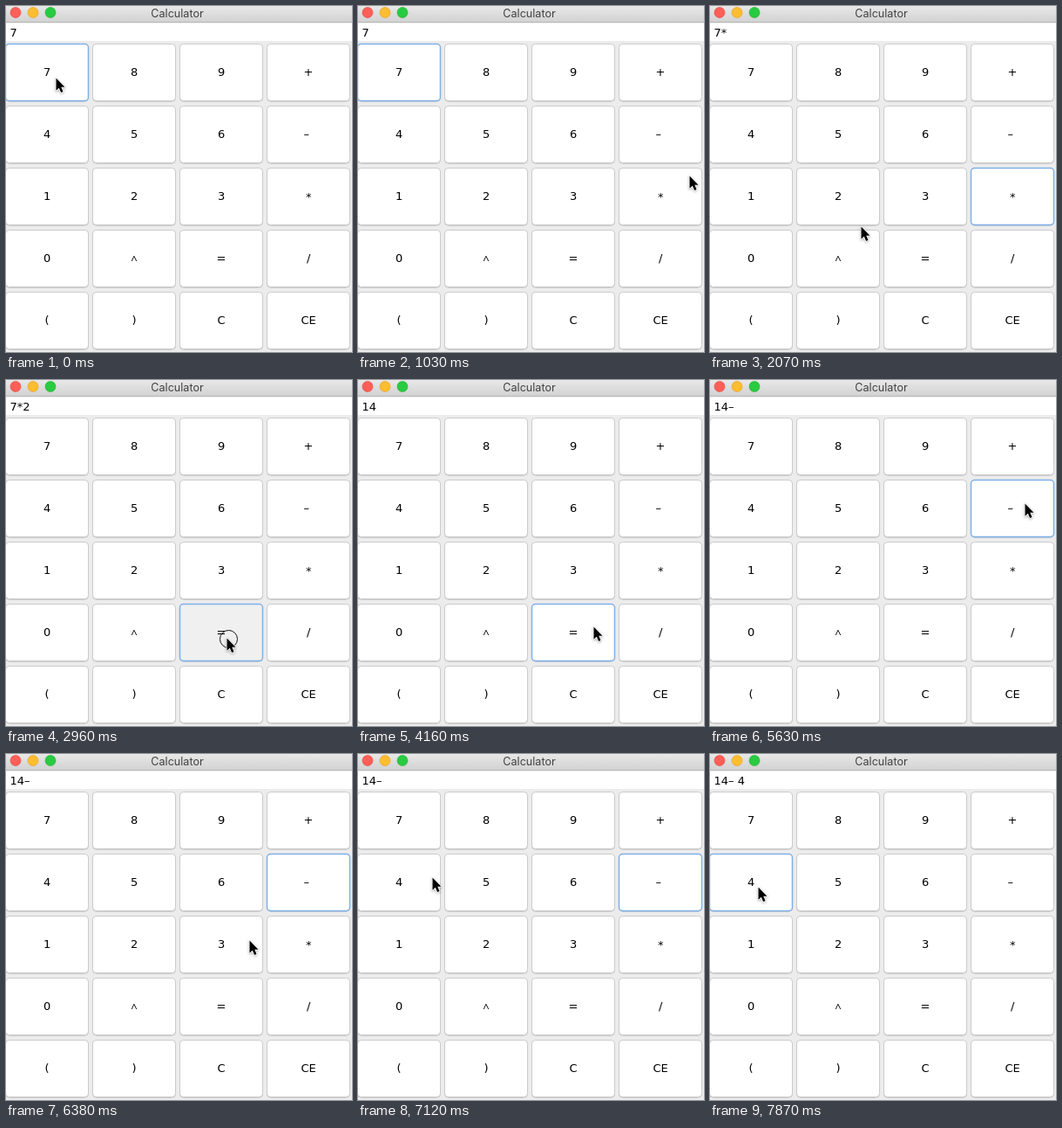
These frames come from a looping animation (397x396 px, 8 s). An HTML page with a canvas:

```html
<!DOCTYPE html>
<html lang="en">
<head>
<meta charset="utf-8">
<title>Calculator</title>
<style>
html, body { margin: 0; width: 100%; height: 100%; overflow: hidden; background: #ececec; }
canvas { display: block; }
</style>
</head>
<body>
<canvas id="stage" width="397" height="396"></canvas>
<script>
const ctx = document.getElementById('stage').getContext('2d');
const LOOP = 8000;
const FONT = '13px "DejaVu Sans", sans-serif';
const KEYS = ['7', '8', '9', '+', '4', '5', '6', '\u2013 ', '1', '2', '3', '*',
  '0', '^', '=', '/', '(', ')', 'C', 'CE'];

// The screen advances in ticks of 150 ms; each entry here shortens the clock by 10 ms.
const SHORT = [8, 8, 14, 19, 32, 32, 36, 46];
const tickStart = n => 150 * n - 10 * SHORT.filter(k => n >= k).length;

// Pointer curves between two ticks: start, control and end point.
const smooth = t => t * t * (3 - 2 * t);
const speedUp = t => Math.pow(t, 1.4);
const linear = t => t;
const MOVES = [
  { a: 1, b: 8, p: [57, 82, 475, 150, 352, 223], ease: smooth },
  { a: 12, b: 14, p: [352, 223, 238, 318, 173, 252], ease: linear },
  { a: 14, b: 16, p: [173, 252, 160, 238, 153, 226], ease: smooth },
  { a: 18, b: 20, p: [153, 226, 205, 250, 253, 295], ease: linear },
  { a: 27, b: 32, p: [253, 295, 340, 235, 362, 156], ease: smooth },
  { a: 32, b: 36, p: [362, 156, 364, 139, 361, 141], ease: smooth },
  { a: 39, b: 47, p: [361, 141, 250, 288, 153, 162], ease: speedUp },
  { a: 47, b: 48, p: [153, 162, 120, 150, 85, 141], ease: linear },
  { a: 48, b: 51, p: [85, 141, 64, 143, 55, 152], ease: smooth }
];

// Mouse down, mouse up, key, and the display after release.
const CLICKS = [
  { down: -1, up: 0, key: '7', text: '7' },
  { down: 11, up: 12, key: '*', text: '7*' },
  { down: 17, up: 18, key: '2', text: '7*2' },
  { down: 20, up: 24, key: '=', text: '14' },
  { down: 37, up: 38, key: '\u2013 ', text: '14\u2013 ' },
  { down: 52, up: 53, key: '4', text: '14\u2013 4' }
];

function pointerAt(tick) {
  const m = MOVES.filter(m => tick >= m.a).pop() || MOVES[0];
  const t = Math.min(1, Math.max(0, (tick - m.a) / (m.b - m.a)));
  const u = m.ease(t), v = 1 - u, p = m.p;
  const mix = i => v * v * p[i] + 2 * u * v * p[i + 2] + u * u * p[i + 4];
  return [Math.round(mix(0)), Math.round(mix(1))];
}

function box(x, y, w, h, r) {
  ctx.beginPath();
  ctx.roundRect(x, y, w, h, r);
}

function disc(x, y, r, fill, line) {
  ctx.beginPath();
  ctx.arc(x, y, r, 0, 7);
  ctx.fillStyle = fill;
  ctx.fill();
  ctx.strokeStyle = line;
  ctx.lineWidth = 0.6;
  ctx.stroke();
}

function drawWindow(text) {
  ctx.fillStyle = '#ececec';
  ctx.fillRect(0, 0, 397, 396);
  const bar = ctx.createLinearGradient(0, 0, 0, 18);
  bar.addColorStop(0, '#e8e8e8');
  bar.addColorStop(1, '#d2d2d2');
  ctx.fillStyle = bar;
  ctx.fillRect(0, 0, 397, 18);
  ctx.fillStyle = '#b8b8b8';
  ctx.fillRect(0, 18, 397, 1);
  disc(11, 7.5, 6, '#fc5f57', '#e2463f');
  disc(31, 7.5, 6, '#fdbd2f', '#e0a022');
  disc(51, 7.5, 6, '#29cb41', '#1dad2b');

  ctx.fillStyle = '#404040';
  ctx.font = '12.6px Inter, Roboto, sans-serif';
  ctx.textAlign = 'center';
  ctx.fillText('Calculator', 196.5, 13);

  ctx.fillStyle = '#fff';
  ctx.fillRect(0, 20, 397, 20);
  ctx.fillStyle = '#000';
  ctx.font = FONT;
  ctx.textAlign = 'left';
  ctx.fillText(text, 4.5, 35);
}

function drawKey(label, i, focused, pressed) {
  const x = i % 4 * 100 - 0.5, y = Math.floor(i / 4) * 71 + 43.5;
  box(x, y + 0.6, 95, 65, 4);
  ctx.strokeStyle = '#b9b9b9';
  ctx.lineWidth = 1;
  ctx.stroke();
  box(x, y, 95, 65, 4);
  ctx.fillStyle = pressed ? '#f0f0f0' : '#fff';
  ctx.fill();
  ctx.strokeStyle = focused ? '#7fb1e8' : '#cbcbcb';
  ctx.lineWidth = focused ? 1.5 : 1;
  ctx.stroke();

  ctx.fillStyle = '#000';
  ctx.font = label === '^' ? '13px "Open Sans", sans-serif' : FONT;
  const drop = label === '^' ? 2 : label === '*' ? 1 : 0;
  const left = x + 47.5 - ctx.measureText(label).width / 2;
  ctx.fillText(label, Math.round(left * 2) / 2, y + 36.5 + drop);
}

function drawPointer(x, y) {
  ctx.save();
  ctx.translate(x + 0.5, y + 0.5);
  ctx.beginPath();
  [[0, 0], [0, 14.2], [3.3, 11.2], [5.6, 16.5], [8, 15.4], [5.8, 10.2], [10, 10.2]]
    .forEach(p => ctx.lineTo(p[0], p[1]));
  ctx.closePath();
  ctx.shadowColor = 'rgba(0,0,0,0.35)';
  ctx.shadowBlur = 3;
  ctx.shadowOffsetY = 1;
  ctx.strokeStyle = '#fff';
  ctx.lineWidth = 1.6;
  ctx.lineJoin = 'round';
  ctx.stroke();
  ctx.shadowColor = 'transparent';
  ctx.fillStyle = '#000';
  ctx.fill();
  ctx.restore();
}

function draw(time) {
  let tick = 0;
  while (tick < 53 && tickStart(tick + 1) <= time) tick++;
  const last = CLICKS.filter(c => tick >= c.down).pop();
  const pressed = tick < last.up;
  const [x, y] = pointerAt(tick);

  drawWindow(CLICKS.filter(c => tick >= c.up).pop().text);
  KEYS.forEach((key, i) => drawKey(key, i, key === last.key, pressed && key === last.key));
  if (pressed) {
    ctx.beginPath();
    ctx.arc(x + 2.5, y + 1.5, 10, 0, 7);
    ctx.strokeStyle = '#111';
    ctx.lineWidth = 1;
    ctx.stroke();
  }
  drawPointer(x, y);
}

const begin = performance.now();
function frame() {
  draw((performance.now() - begin) % LOOP);
  requestAnimationFrame(frame);
}
frame();
</script>
</body>
</html>
```
